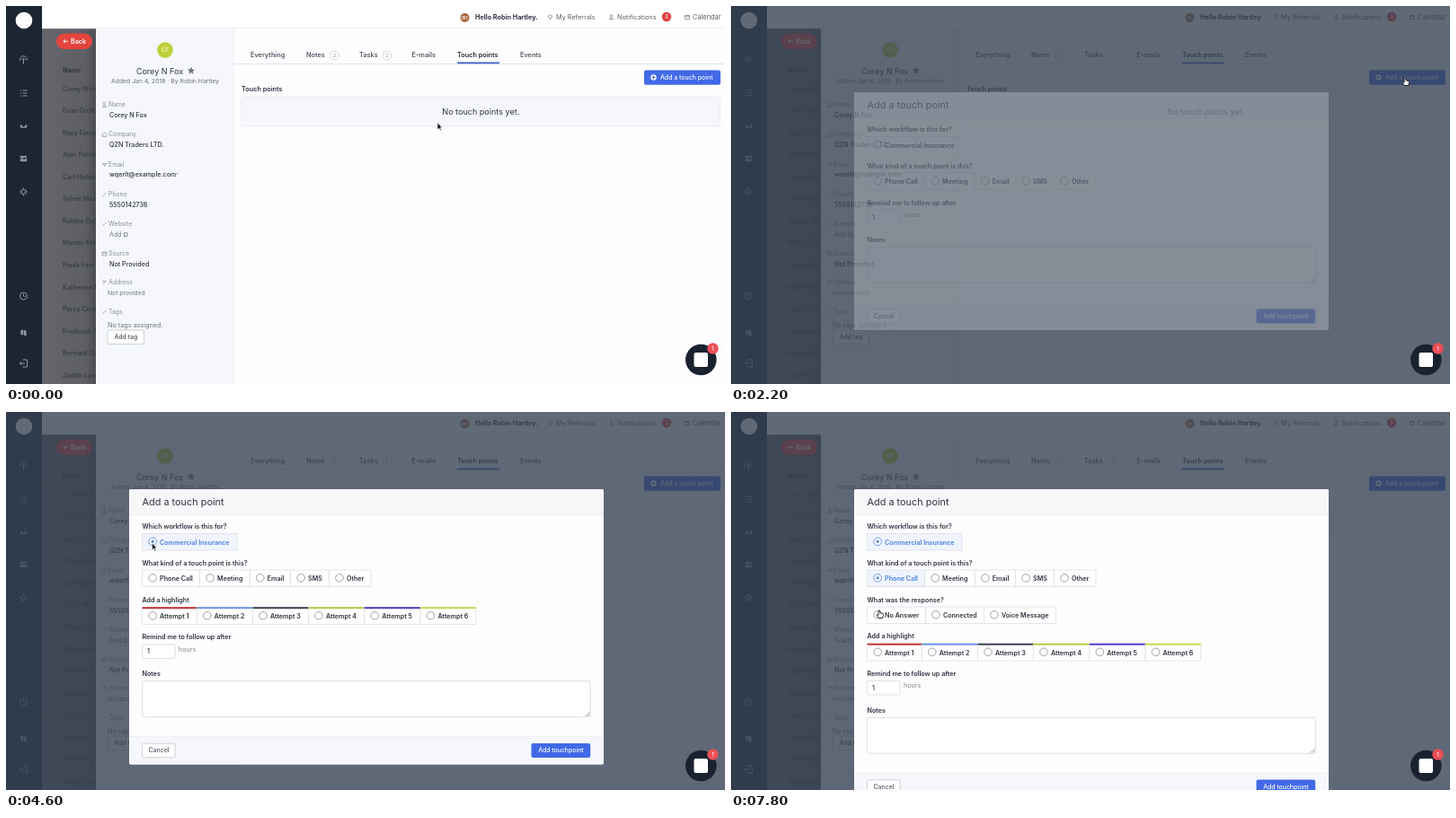
These frames come from a looping animation (800 px wide and 421 px high, 8000 ms). An HTML page:

```html
<!DOCTYPE html>
<html lang="en">
<head>
<meta charset="utf-8">
<title>Adding a touch point</title>
<style>
html, body { margin: 0; width: 100%; height: 100%; overflow: hidden; background: #fff; }
svg { display: block; width: 100%; height: 100%; font-family: Inter, "Open Sans", sans-serif; }
</style>
</head>
<body>
<svg id="stage" viewBox="0 0 800 421"></svg>
<script>
const INK = '#2f3440', GREY = '#80858f', BLUE = '#4169e8', LINE = '#dcdfe6';

// y is the middle of the capitals
const text = (x, y, s, size = 7.15, weight = 500, fill = INK, anchor = 'start') =>
  `<text x="${x}" y="${y + size * .36}" font-size="${size}" font-weight="${weight}" fill="${fill}" text-anchor="${anchor}">${s}</text>`;
const rect = (x, y, w, h, fill, stroke = 'none', r = 0) =>
  `<rect x="${x}" y="${y}" width="${w}" height="${h}" fill="${fill}" stroke="${stroke}" stroke-width=".8" rx="${r}"/>`;
const circle = (x, y, r, fill, stroke = 'none') =>
  `<circle cx="${x}" cy="${y}" r="${r}" fill="${fill}" stroke="${stroke}" stroke-width=".8"/>`;
const icon = (x, y, d, stroke, fill = 'none', width = 1) =>
  `<path transform="translate(${x} ${y})" d="${d}" fill="${fill}" stroke="${stroke}" stroke-width="${width}"/>`;

const glyphs = {
  gauge: 'M-3.5 1A3.8 3.8 0 1 1 3.5 1M0-1V5M-2 0L0-2L2 0',
  list: 'M-3.5-3h1M-1-3h5M-3.5 0h1M-1 0h5M-3.5 3h1M-1 3h5',
  mail: 'M-4-2.5H4V2.5H-4ZM-4-2.5L0 .8L4-2.5',
  chart: 'M-4-3.5H4V3.5H-4ZM-4 1L-1.5-1L.5 1L4-2',
  gear: 'M0-4.5V4.5M-4.5 0H4.5M-3-3L3 3M-3 3L3-3',
  clock: 'M-4 0a4 4 0 1 1 8 0a4 4 0 1 1-8 0M0-2.5V.3H2',
  book: 'M-3.5-3L0-4L3.5-2V4L0 3L-3.5 2ZM0-4V3',
  exit: 'M-1-4H4V4H-1M1.5 0H-4M-2-2L-4 0L-2 2',
  person: 'M-1.2-1.5a1.2 1.2 0 1 1 2.4 0a1.2 1.2 0 1 1-2.4 0M-2.3 2.3Q0-.8 2.3 2.3Z',
  home: 'M-2.3 0L0-2.3L2.3 0V2.3H-2.3Z',
  plane: 'M-2.5-1H2.5L0 2L-.3 0Z',
  pen: 'M-2 2L2-2',
  card: 'M-2.5-2H2.5V2H-2.5ZM-2.5-.8H2.5',
  flag: 'M-2-1.5H2.5M-.5-1.5V2',
  pin: 'M0 2.5L-2-.5Q-2-2.5 0-2.5Q2-2.5 2-.5Z'
};

function sidebar() {
  const items = { gauge: 60, list: 97, mail: 133.5, chart: 170, gear: 207, clock: 323, book: 364, exit: 398 };
  const solid = { mail: 1, chart: 1, book: 1 };
  return rect(0, 0, 40, 421, '#1c2532') + circle(20, 16, 9.3, '#fff') +
    Object.entries(items).map(([k, y]) => solid[k]
      ? icon(19.5, y, glyphs[k], '#1c2532', '#8a97ad', .7)
      : icon(19.5, y, glyphs[k], '#8a97ad')).join('') +
    circle(19.5, 207, 2.2, '#1c2532', '#8a97ad');
}

function contacts() {
  const names = ['Evan Croft', 'Nora Finch', 'Alan Petrie', 'Carl Hobbs', 'Sylvie Marsh', 'Robbie Dale', 'Marion Kerr',
    'Paula Finn', 'Katherine Roe', 'Percy Coates', 'Frederick Ash', 'Bernard Cole', 'Judith Lane'];
  names.splice(0, 0, 'Corey N Fox');
  return rect(40, 25, 60, 396, 'url(#dim)') + text(63, 71, 'Name', 7.2, 600, '#30333a') +
    names.map((n, i) => text(63, 92 + i * 24.55, n, 7.2, 500, '#363941')).join('') +
    rect(56, 30.5, 40, 17.5, '#e4443e', 'none', 8.7) +
    icon(66.5, 39.3, 'M2.5 0H-2.5M-.5-2L-2.5 0L-.5 2', '#fff') + text(72, 39.3, 'Back', 7.2, 600, '#fff');
}

function header() {
  return rect(40, 0, 760, 25, '#fff') + rect(40, 24.5, 760, .8, '#e2e4e8') +
    circle(510.5, 13, 5, '#a9683f') + text(510.5, 13, 'RH', 4.5, 600, '#fff', 'middle') +
    text(522, 12.5, 'Hello Robin Hartley.', 7.25, 700) +
    icon(605.5, 12.5, glyphs.pin, GREY, 'none', .8) + text(612, 12.5, 'My Referrals', 7.3, 400, '#5d626c') +
    icon(673.5, 12.5, glyphs.person, GREY, 'none', .8) + text(680, 12.5, 'Notifications', 7.3, 400, '#5d626c') +
    circle(735, 12, 5.2, '#e0403f') + text(735, 12, '3', 5.5, 600, '#fff', 'middle') +
    icon(758, 12.5, glyphs.card, GREY, 'none', .8) + text(764, 12.5, 'Calendar', 7.4, 400, '#5d626c');
}

function profile() {
  const fields = [
    [110, 'person', 'Name', 'Corey N Fox'], [143, 'home', 'Company', 'QZN Traders LTD.'],
    [176.5, 'plane', 'Email', 'wqerlt@example.com'], [210, 'pen', 'Phone', '5550142736'],
    [243, 'pen', 'Website', ''], [276, 'card', 'Source', 'Not Provided'],
    [308, 'flag', 'Address', ''], [341, 'pen', 'Tags', '']];
  return rect(100, 25, 154, 396, '#f5f7fc') + rect(253.6, 25, .9, 396, '#dfe4ef') +
    circle(177, 49, 8.8, '#bdd03a') + text(177, 49, 'CF', 6.2, 600, '#f2f6d0', 'middle') +
    text(171, 73, 'Corey N Fox', 9, 400, INK, 'middle') +
    icon(206, 72, 'M0-4.2L1.2-1.4L4.2-1.2L1.9.7L2.6 3.7L0 2L-2.6 3.7L-1.9.7L-4.2-1.2L-1.2-1.4Z', 'none', '#72767e') +
    text(177, 83.5, 'Added Jan 4, 2018 · By Robin Hartley', 6.85, 400, '#6d727c', 'middle') +
    fields.map(([y, g, label, value]) => icon(109.5, y, glyphs[g], '#9398a2', 'none', .8) +
      text(114, y, label, 6.9, 400, '#8a8f99') + text(115, y + 11.3, value)).join('') +
    icon(189.5, 187.5, glyphs.pen, '#9398a2') +
    text(115, 254.5, 'Add', 7.1, 400, '#70757f') + rect(131.3, 252.8, 3.6, 3.6, 'none', '#70757f') +
    text(113, 319.5, 'Not provided', 6.8, 400, '#70757f') +
    text(113, 355.5, 'No tags assigned.', 7.25, 400, '#70757f') +
    rect(113, 361, 40.5, 15.5, '#fff', '#b9c9c4', 2) + text(133.3, 368.7, 'Add tag', 6.9, 500, '#4d525c', 'middle');
}

function main() {
  const tabs = { Everything: 272, Notes: 334, Tasks: 393, 'E-mails': 451.5, 'Touch points': 502, Events: 572 };
  return rect(254, 25, 546, 396, '#fdfdfe') + rect(254, 64, 546, .9, '#dde2ee') +
    Object.entries(tabs).map(([s, x]) => text(x, 54.5, s, 7.3, 600, x == 502 ? '#252a36' : '#555a66')).join('') +
    rect(502, 62.5, 47, 1.8, '#3f63c8') +
    [365.5, 424].map(x => circle(x, 55, 4.8, '#fff', '#c9cdd5') + text(x, 55, '2', 5.2, 400, GREY, 'middle')).join('') +
    `<rect id="add" x="710" y="71.5" width="85" height="16.3" rx="2"/>` +
    circle(720.5, 79.5, 3.2, '#fff') + icon(720.5, 79.5, 'M-2 0H2M0-2V2', BLUE) +
    text(728, 79.7, 'Add a touch point', 6.95, 500, '#fff') +
    text(262, 92, 'Touch points', 7.3, 600) +
    rect(262, 101.5, 532.5, 32.5, '#f5f7fd', '#e4e8f2', 1) +
    text(528.3, 118, 'No touch points yet.', 9.05, 400, INK, 'middle');
}

// One row of joined radio buttons; edges are the x positions between cells
function options(y, labels, edges, chosen = -1, bars) {
  const cells = labels.map((s, i) => {
    const x = edges[i], w = edges[i + 1] - x, on = i === chosen, color = on ? '#4a7fe0' : INK;
    return rect(x, y, w, 18.5, on ? '#eff4fd' : '#fff', LINE) +
      (bars ? rect(x, y - .8, w, 2, bars[i]) : '') +
      circle(x + 11.5, y + 8.8, 4.3, '#fff', on ? color : '#868b95') +
      (on ? circle(x + 11.5, y + 8.8, 1.5, color) : '') +
      text(x + 19.4, y + 9.5, s, 7.15, 600, color);
  });
  return cells.join('');
}

function modal(stage) {
  const dy = [0, 41.5, 82][stage], hy = stage === 2 ? 40.5 : 0, bottom = 351 + dy;
  const label = (y, s) => text(151.5, y, s, 7.2, 600);
  let out = rect(137, 86, 528, bottom - 86, '#fdfdfe', 'none', 2) +
    rect(137, 86, 528, 28.5, '#f7f7f9', 'none', 2) + rect(137, 114.2, 528, .8, '#e6e8ec') +
    text(151.5, 100.5, 'Add a touch point', 10.9, 400) +
    label(127, 'Which workflow is this for?') +
    options(135.5, ['Commercial Insurance'], [151.7, 257], stage ? 0 : -1) +
    label(168, 'What kind of a touch point is this?') +
    options(176, ['Phone Call', 'Meeting', 'Email', 'SMS', 'Other'], [151.7, 215.7, 271.3, 316.7, 359.5, 406], stage === 2 ? 0 : -1);
  if (stage === 2) out += label(209, 'What was the response?') +
    options(217, ['No Answer', 'Connected', 'Voice Message'], [151.7, 216.5, 281.5, 361.7]);
  if (stage) out += label(209 + hy, 'Add a highlight') +
    options(218 + hy, [1, 2, 3, 4, 5, 6].map(n => 'Attempt ' + n), [151.7, 212.3, 274.5, 336.5, 398.8, 461, 522.8], -1,
      ['#c22f35', '#6a95e6', '#3d4050', '#b3cb45', '#5636c6', '#c6d94c']);
  return out + label(209 + dy, 'Remind me to follow up after') +
    rect(151.7, 217.3 + dy, 36.5, 15.7, '#fff', '#d3d7df', 1.5) + text(157, 225.2 + dy, '1', 7.2, 500) +
    text(192, 222.7 + dy, 'hours', 7.2, 400, GREY) +
    label(250 + dy, 'Notes') + rect(151.7, 258.3 + dy, 498.5, 40, '#fff', '#d3d7df', 1.5) +
    icon(647, 295 + dy, 'M-2 2.5L2.5-2M.5 2.5L2.5.5', '#858a94', 'none', .8) +
    rect(137, 320 + dy, 528, 31, '#f5f7fb', 'none', 2) + rect(137, 319.7 + dy, 528, .7, '#eceef3') +
    rect(151.7, 327.8 + dy, 36.5, 15.5, '#fff', '#c3c8d1', 1.5) + text(170, 335.5 + dy, 'Cancel', 6.9, 500, '#555a66', 'middle') +
    rect(584.5, 327.5 + dy, 65.7, 16, BLUE, 'none', 2) + text(617.4, 335.5 + dy, 'Add touchpoint', 6.9, 500, '#fff', 'middle');
}

const $ = id => document.getElementById(id);
$('stage').innerHTML = `<defs><linearGradient id="dim">
  <stop offset="0" stop-color="#64666b"/><stop offset=".8" stop-color="#5d5f65"/><stop offset="1" stop-color="#4c4e54"/>
  </linearGradient></defs>` + contacts() + header() + profile() + main() + sidebar() +
  `<rect id="shade" width="800" height="421" fill="rgb(54,65,82)" fill-opacity=".79"/><g id="modal"></g>` +
  circle(773.3, 394, 17.3, '#1a2230') + rect(765.5, 386, 15.5, 16, '#fff', 'none', 2) +
  circle(786.5, 381.5, 6.2, '#ec4f57') + text(786.5, 381.5, '1', 6, 500, '#fff', 'middle') +
  `<g id="cursor"><path id="arrow" d="M0 0V7.6L1.8 6L3 8.8L4.3 8.2L3.1 5.5H5.4Z" fill="#111" stroke="#fff" stroke-width=".6"/>
  <path id="hand" d="M-.9 5V.8Q0-.4.9.8V3.2L4 4Q4.8 4.4 4.5 5.8L3.7 9H-.6L-3 5.8Q-2.6 4.4-.9 5.8Z" fill="#fff" stroke="#111" stroke-width=".9"/></g>`;

// time, x, y of the pointer tip
const path = [[0, 480, 130], [200, 480, 130], [600, 487, 181], [800, 487, 181], [1800, 750, 79.5], [2800, 750, 79.5],
  [4200, 162.5, 146], [5400, 162.5, 146], [6200, 163, 186.5], [6800, 163, 186.5], [7600, 165, 220.5], [8000, 165, 220.5]];

function pointer(t) {
  const i = path.findIndex(p => p[0] > t), [t0, x0, y0] = path[i - 1], [t1, x1, y1] = path[i];
  const u = (t - t0) / (t1 - t0), e = u * u * (3 - 2 * u);
  return [x0 + (x1 - x0) * e, y0 + (y1 - y0) * e];
}

let shown;
function draw(now) {
  const t = Math.floor(now % 8000 / 200) * 200;
  const stage = t < 2200 ? -1 : t < 4600 ? 0 : t < 6600 ? 1 : 2;
  if (stage !== shown) $('modal').innerHTML = stage < 0 ? '' : modal(stage);
  shown = stage;
  const entering = t === 2200;
  $('modal').setAttribute('opacity', entering ? .25 : 1);
  $('modal').setAttribute('transform', `translate(0 ${entering ? 10 : 0})`);
  $('shade').setAttribute('visibility', stage < 0 ? 'hidden' : 'visible');
  $('add').setAttribute('fill', t >= 1800 && stage < 0 ? '#5b80de' : BLUE);
  const hand = t >= 1800 && t <= 2800 || t >= 7400;
  $('hand').setAttribute('visibility', hand ? 'visible' : 'hidden');
  $('arrow').setAttribute('visibility', hand ? 'hidden' : 'visible');
  $('cursor').setAttribute('transform', `translate(${pointer(t)})`);
  requestAnimationFrame(draw);
}
requestAnimationFrame(draw);
</script>
</body>
</html>
```
